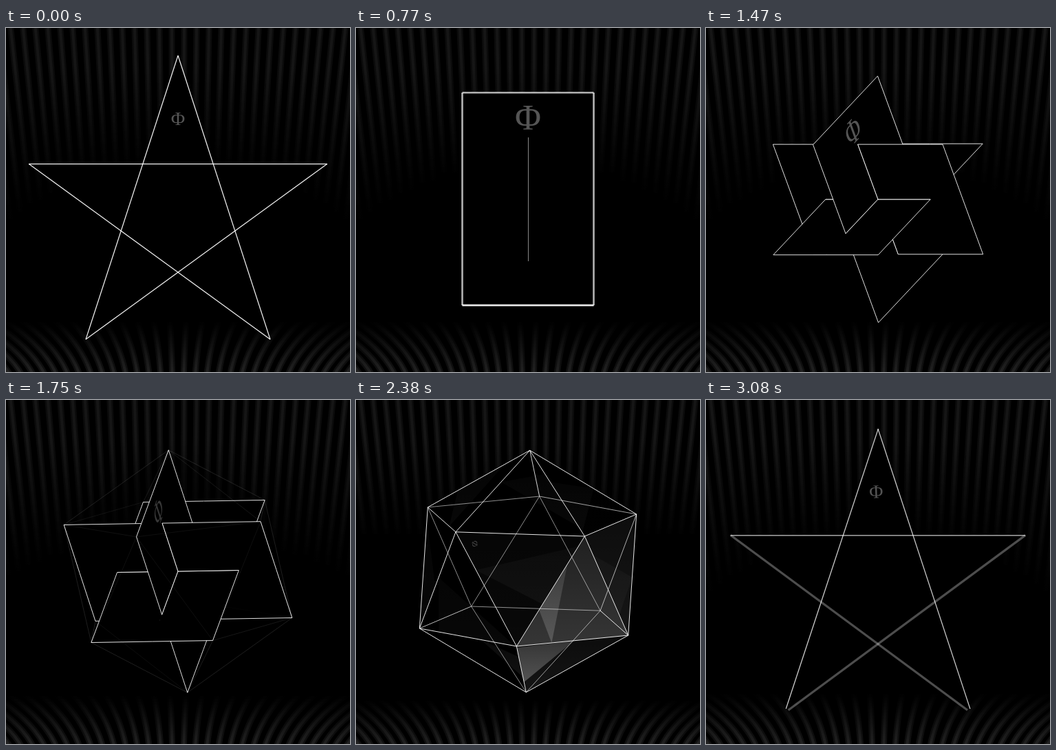
Write an HTML page with a canvas that moves like this. It is 500 px wide and 500 px high and loops after 3150 ms.

```html
<!DOCTYPE html>
<html lang="en">
<head>
<meta charset="utf-8">
<title>Golden solid</title>
<style>
html, body { margin: 0; width: 100%; height: 100%; overflow: hidden; background: #000; }
canvas { display: block; width: 500px; height: 500px; }
</style>
</head>
<body>
<canvas id="stage" width="500" height="500"></canvas>
<script>
const ctx = document.getElementById('stage').getContext('2d');
const LOOP = 3150, STEP = 70, PHI = (1 + Math.sqrt(5)) / 2;
const CX = 250, CY = 249, UNIT = 95.5;

const clamp = v => Math.max(0, Math.min(1, v));
const mix = (a, b, k) => a + (b - a) * k;
const mixAll = (a, b, k) => a.map((v, i) => Array.isArray(v) ? mixAll(v, b[i], k) : mix(v, b[i], k));
const ramp = (t, a, b) => { const k = clamp((t - a) / (b - a)); return k * k * (3 - 2 * k); };
const white = a => `rgba(255,255,255,${a})`;
const black = a => `rgba(0,0,0,${a})`;
const dot = (a, b) => a[0] * b[0] + a[1] * b[1] + a[2] * b[2];
const cross = (a, b) => [a[1] * b[2] - a[2] * b[1], a[2] * b[0] - a[0] * b[2], a[0] * b[1] - a[1] * b[0]];
const unit = a => a.map(v => v / Math.hypot(...a));
const random = n => { const v = Math.sin(n * 12.9898) * 43758.5453; return v - Math.floor(v); };

function trace(points, closed) {
  ctx.beginPath();
  points.forEach(p => ctx.lineTo(p[0], p[1]));
  if (closed) ctx.closePath();
}
function stroke(points, style, width) {
  trace(points);
  ctx.strokeStyle = style;
  ctx.lineWidth = width;
  ctx.stroke();
}
function fill(points, style) {
  trace(points, true);
  ctx.fillStyle = style;
  ctx.fill();
}
function fade(y0, y1, a0, a1) {
  const g = ctx.createLinearGradient(0, y0, 0, y1);
  g.addColorStop(0, white(a0));
  g.addColorStop(1, white(a1));
  return g;
}

// Striped curtain above and a floor below, both narrowing downwards
function drawRoom(t) {
  const low = ramp(t, 1500, 2200) * (1 - ramp(t, 2700, 3050));
  for (let i = -18.5; i < 19; i++) {
    const x = 17 * i, side = (x / 250) ** 2;
    const end = 205 + mix(75, 5, low) * side;
    const top = [], floor = [];
    for (let y = 0; y <= end; y += 15) top.push([CX + x * (1.06 - 0.12 * y / 250), y]);
    for (let y = 425; y <= 505; y += 8) {
      const k = (500 - y) / 75;
      floor.push([CX + x * (1 + 0.2 * k + 0.2 * k * k), y]);
    }
    const roof = fade(60, end, 0.045, 0), ground = fade(425 + 10 * low, 500, 0, 0.065);
    for (const w of [9, 4]) {
      stroke(top, roof, w);
      stroke(floor, ground, w);
    }
  }
}

// Five strokes in this order: left side, right side, bar, two diagonals
const [TIP, RIGHT, LOW_R, LOW_L, LEFT] = [0, 1, 2, 3, 4].map(n => {
  const a = n * Math.PI * 0.4;
  return [CX + 228 * Math.sin(a), 268 - 228 * Math.cos(a)];
});
const STAR = [[TIP, LOW_L], [TIP, LOW_R], [LEFT, RIGHT], [LEFT, LOW_R], [RIGHT, LOW_L]];
const corner = (sx, sy) => [CX + sx * UNIT, 248.5 + sy * UNIT * PHI];
const [TL, TR, BL, BR] = [corner(-1, -1), corner(1, -1), corner(-1, 1), corner(1, 1)];
const FRAME = [[TL, BL], [TR, BR], [TL, TR], [BL, BR], [BR, BL]];

function fillStrokes([left, right, bar, d1, d2], alpha) {
  fill([left[0], left[1], d2[0], bar[0], d1[1], right[0]], black(alpha));
}

function drawPhi(m, size, alpha) {
  if (alpha <= 0) return;
  ctx.save();
  ctx.transform(...m);
  ctx.font = `${size}px "Liberation Serif", serif`;
  ctx.textAlign = 'center';
  ctx.fillStyle = `rgba(85,85,85,${alpha})`;
  ctx.fillText('Φ', 0, size * 0.33);
  ctx.restore();
}

// Turning keys: time, then yaw, pitch and roll in degrees
const TURNS = [[770, 0, 0, 0], [1470, 54, 32, 0], [2030, 86, 48, 2.5], [2380, 120, 44.5, 5.6], [2660, 124.4, 43.6, 6.3]];

function turnAt(t) {
  const last = TURNS.length - 1;
  t = Math.max(TURNS[0][0], Math.min(TURNS[last][0], t));
  let n = 0;
  while (n < last - 1 && t > TURNS[n + 1][0]) n++;
  const a = TURNS[n], b = TURNS[n + 1], h = b[0] - a[0], k = (t - a[0]) / h;
  const slope = (j, c) => {
    if (j === 0 || j === last) return 0;
    const p = TURNS[j - 1], q = TURNS[j + 1];
    return h * (q[c] - p[c]) / (q[0] - p[0]);
  };
  return [1, 2, 3].map(c => Math.PI / 180 * (mix(a[c], b[c], k * k * (3 - 2 * k))
    + k * (1 - k) * ((1 - k) * slope(n, c) - k * slope(n + 1, c))));
}

// Screen rows over the model axes X, Y, Z
function pose(t) {
  const [yaw, pitch, roll] = turnAt(t);
  const [sy, cy, sp, cp, sr, cr] = [yaw, pitch, roll].flatMap(a => [Math.sin(a), Math.cos(a)]);
  const across = [sy, -cy * sp, cy * cp], down = [0, -cp, -sp];
  const x = across.map((v, i) => v * cr + down[i] * sr);
  const y = down.map((v, i) => v * cr - across[i] * sr);
  const s = UNIT - 1.3 * ramp(t, 770, 1470) + 15.5 * ramp(t, 2400, 2680) + 12 * ramp(t, 2660, 2950);
  return { x, y, z: cross(x, y), s };
}
const project = (p, v) => [CX + p.s * dot(p.x, v), CY + p.s * dot(p.y, v), p.s * dot(p.z, v)];

// Golden rectangles as [long axis, short axis]; each is cut into quadrants
const CARDS = [[1, 2], [2, 0], [0, 1]];
const SIGNS = [[-1, -1], [-1, 1], [1, -1], [1, 1]];
const place = ([l, s], u, w) => { const v = [0, 0, 0]; v[l] = u; v[s] = w; return v; };

function drawCards(p, t, alpha) {
  const grow = [1, ramp(t, 780, 1100), 1];
  const quads = CARDS.flatMap((card, n) => SIGNS.map(([a, b]) => ({
    card, n, a, b, depth: a * Math.sign(p.z[card[0]]) + b * Math.sign(p.z[card[1]])
  }))).sort((q, r) => q.depth - r.depth);
  const solid = 1 - ramp(t, 2040, 2200);
  const line = white(mix(0.88, 0.7, ramp(t, 1700, 2030)) * alpha);
  const width = mix(2.6, 1, ramp(t, 770, 980));
  for (const { card, n, a, b } of quads) {
    const g = grow[n];
    if (g <= 0) continue;
    const at = (u, w) => project(p, place(card, u * a * g, w * b * g));
    const o = at(0, 0), far = at(PHI, 0), tip = at(PHI, 1), near = at(0, 1);
    fill([o, far, tip, near], black(solid));
    stroke([far, tip, near], line, n ? 1 : width);
    stroke([near, o, at(1, 0)], line, 1);
  }
}

const VERTS = CARDS.flatMap(card => SIGNS.map(([a, b]) => place(card, a * PHI, b)));
const linked = (a, b) => Math.hypot(...a.map((q, n) => q - b[n])) < 2.1;
const LINKS = [], FACES = [];
VERTS.forEach((a, i) => VERTS.slice(i + 1).forEach((b, j) => {
  if (!linked(a, b)) return;
  LINKS.push([a, b]);
  VERTS.slice(i + j + 2).forEach(c => { if (linked(a, c) && linked(b, c)) FACES.push([a, b, c]); });
}));

function drawEdges(p, t) {
  const show = ramp(t, 1650, 2000) * (1 - ramp(t, 2640, 2900));
  const late = ramp(t, 2100, 2330), soft = ramp(t, 2430, 2650);
  for (const link of LINKS) {
    const [u, v] = link.map(q => project(p, q)), depth = (u[2] + v[2]) / 2;
    const inner = clamp((Math.abs(depth) - 45) / 45);
    const target = depth > 0 ? mix(0.3, 0.9, late) : 0.55 * late;
    const alpha = mix(mix(mix(0.6, 0.9, late), target, inner), 0.34, soft);
    stroke([u, v], white(show * alpha), mix(1, 2.2, soft));
  }
}

// Glass: each near face is shaded by a sweeping light and carries one random shard
const SHARD_LIGHT = unit([0.35, 0.75, 0.55]);
function drawGlass(p, t) {
  const show = ramp(t, 1780, 2020) * (1 - ramp(t, 2400, 2610));
  if (show <= 0) return;
  const sweep = ramp(t, 2030, 2380);
  const light = unit(mixAll([-0.7, -0.45, 0.55], [0.6, 0.4, 0.7], sweep));
  const paint = (pts, level) => {
    const ys = pts.map(q => q[1]);
    fill(pts, fade(Math.min(...ys), Math.max(...ys), level * show * 0.6, level * show));
  };
  FACES.forEach((face, n) => {
    const pts = face.map(v => project(p, v));
    const normal = unit([0, 1, 2].map(c => pts[0][c] - (c < 2 ? [CX, CY][c] : 0)
      + pts[1][c] - (c < 2 ? [CX, CY][c] : 0) + pts[2][c]  - (c < 2 ? [CX, CY][c] : 0)));
    if (normal[2] <= 0) return;
    paint(pts, mix(0.1, 0.22, sweep) * Math.max(0, dot(normal, light)) ** 4);
    const r = k => random(n * 7 + k), [a, b, c] = pts;
    const shard = [mixAll(a, b, 0.5 * r(1)), mixAll(a, b, 0.6 + 0.4 * r(2)), mixAll(b, c, 0.3 + 0.5 * r(3))];
    paint(shard, 0.03 + 0.28 * Math.max(0, dot(normal, SHARD_LIGHT)) ** 5);
  });
}

function drawOpening(t) {
  const k = ramp(t, 0, 750), lines = mixAll(STAR, FRAME, k);
  fillStrokes(lines, 1);
  lines.forEach(l => stroke(l, white(mix(0.95, 0.7, k)), mix(1.2, 2.6, k)));
  const reach = UNIT * ramp(t, 420, 830);
  if (reach > 0) stroke([[250.5, CY - reach], [250.5, CY + reach]], white(0.5), 1.1);
  drawPhi([1, 0, 0, 1, 250, mix(131.5, 130.5, k)], mix(28, 52, k), 1);
}

// Near face of the solid; its mirror image is the far face
const NEAR = [[-PHI, 1, 0], [0, PHI, -1], [-1, 0, -PHI]];

function drawClosing(p, t, out) {
  const [a, b, c] = NEAR.map(v => project(p, v));
  const [fa, fb, fc] = NEAR.map(v => project(p, v.map(q => -q)));
  const stretch = 0.05 * ramp(t, 2380, 2660);
  const extend = ([u, v]) => [mixAll(u, v, -stretch), mixAll(u, v, 1 + stretch)].map(q => q.slice(0, 2));
  const start = [[fc, fb], [fc, fa], [a, b], [a, c], [b, c]].map(extend);
  const lines = mixAll(start, STAR, out);
  fillStrokes(lines, ramp(t, 2720, 3000));
  const show = ramp(t, 2420, 2640);
  stroke(extend([fb, fa]), white(0.3 * show * (1 - ramp(t, 2660, 2900))), 3.5);
  lines.forEach((l, i) => stroke(l, white(show * (i > 2 ? 0.3 : 0.8)), i > 2 ? 3.2 : 1.3));
}

function draw(t) {
  ctx.fillStyle = '#000';
  ctx.fillRect(0, 0, 500, 500);
  drawRoom(t);
  if (t <= 770) return drawOpening(t);

  const p = pose(t);
  const body = ramp(t, 1650, 1950) * (1 - ramp(t, 2450, 2650));
  FACES.forEach(face => fill(face.map(v => project(p, v)), black(body * 0.9)));

  const cards = 1 - ramp(t, 2040, 2280);
  if (cards > 0) drawCards(p, t, cards);
  const spot = project(p, [0, 1.24, 0]);
  drawPhi([p.x[2], p.y[2], -p.x[1], -p.y[1], spot[0], spot[1]], 52, 1 - ramp(t, 1650, 1900));

  drawGlass(p, t);
  if (t > 1650) drawEdges(p, t);

  const out = 1 - (1 - clamp((t - 2660) / 490)) ** 1.8;
  if (t > 2380) drawClosing(p, t, out);
  const weights = [0.8, 0.1, 0.1];
  const mark = project(p, [0, 1, 2].map(c => dot(weights, NEAR.map(v => v[c]))));
  const turn = mix(-1.05, 0, out), c = Math.cos(turn), s = Math.sin(turn);
  drawPhi([c, s, -s, c, mix(mark[0], 250, out), mix(mark[1], 131.5, out)],
    mix(mix(13, 16, ramp(t, 2380, 2660)), 28, out), mix(0.75, 1, out) * ramp(t, 1950, 2200));
}

function tick() {
  const t = performance.now() % LOOP;
  draw(Math.floor(t / STEP) * STEP);
  requestAnimationFrame(tick);
}
tick();
</script>
</body>
</html>
```
